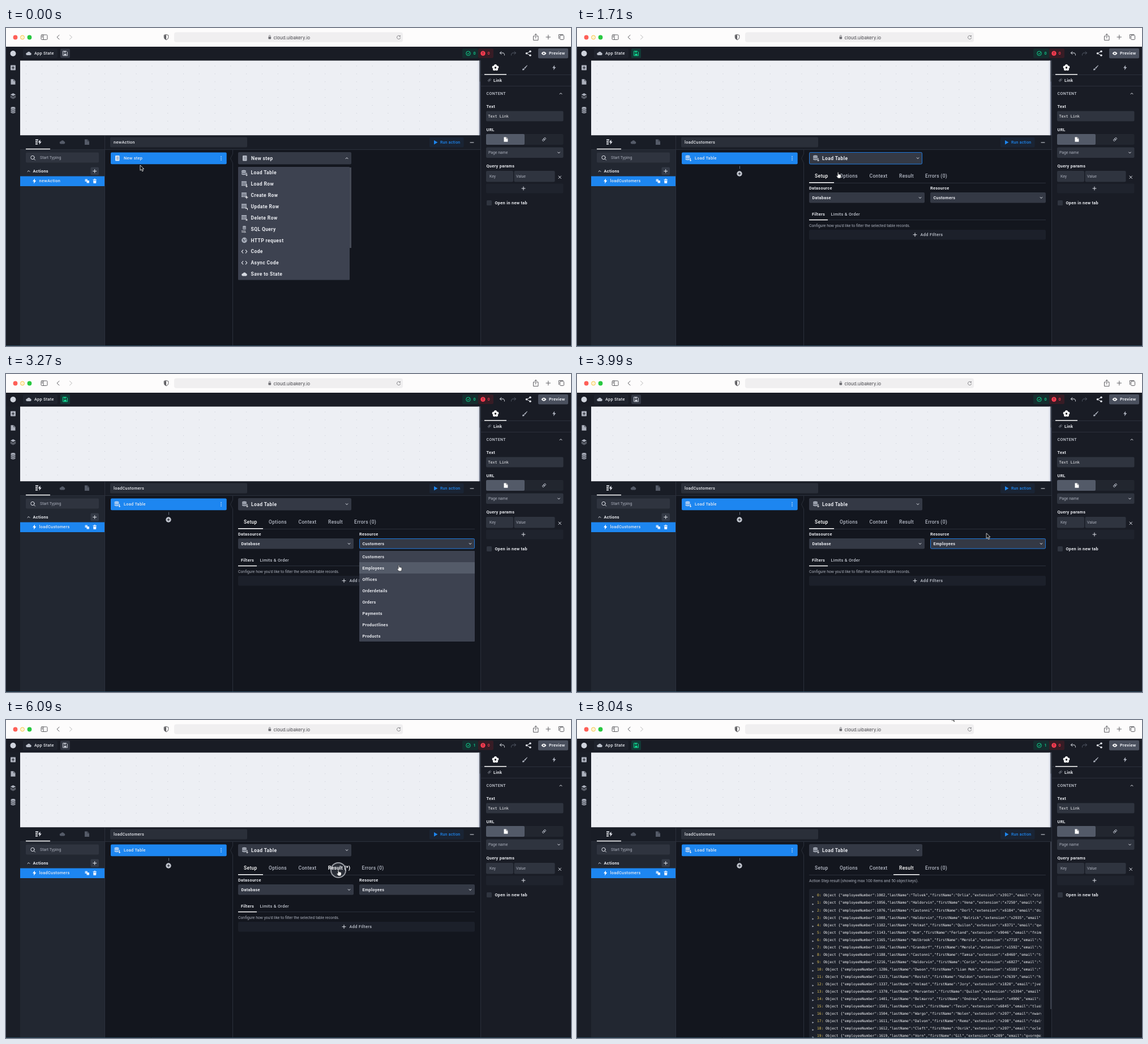
These frames come from a looping animation (998 px wide and 561 px high, 8070 ms). An HTML page:

```html
<!DOCTYPE html>
<html lang="en">
<head>
<meta charset="utf-8">
<title>Load Table action</title>
<style>
html,body{margin:0;width:100%;height:100%;overflow:hidden;background:#13161e}
svg{display:block}
#stage{width:998px;height:561px}
text{font:500 7.3px Roboto,sans-serif;letter-spacing:.33px;fill:#e9ebf0;white-space:pre}
text.b{font-weight:700}
text.h{font-weight:700;font-size:8.5px;letter-spacing:.4px}
text.tab{font-size:8.5px;letter-spacing:.34px;fill:#b4b9c5}
text.r{font-weight:400;font-size:6.85px;letter-spacing:0;fill:#a9aeba}
text.on{fill:#fff}
text.url{font:400 8px Inter,sans-serif;letter-spacing:0;fill:#45454a}
text.code{font:400 6.26px "DejaVu Sans Mono",monospace;letter-spacing:0;fill:#f8f9fb}
.field{fill:#2f343f}
.select{fill:#343945}
.menu{fill:#3d4250}
.blue{fill:#1d86f0}
.line{fill:none;stroke:#dfe2e9;stroke-linecap:round;stroke-linejoin:round}
.thin{stroke:#2b303b;stroke-width:1}
.focus{fill:none;stroke:#1d76d8}

.s{opacity:0;animation:var(--k) 8.07s step-end infinite}
@keyframes fresh{0%{opacity:1}18.96%{opacity:0}}
@keyframes ready{0%{opacity:0}18.96%{opacity:1}}
@keyframes rowHover{0%{opacity:0}12.8%{opacity:1}18.96%{opacity:0}}
@keyframes stepFocus{0%{opacity:0}18.96%{opacity:1}35.32%{opacity:0}}
@keyframes customers{0%{opacity:1}44.11%{opacity:0}}
@keyframes employees{0%{opacity:0}44.11%{opacity:1}}
@keyframes resFocus{0%{opacity:0}35.32%{opacity:1}60.7%{opacity:0}}
@keyframes resMenu{0%{opacity:0}35.32%{opacity:1}44.11%{opacity:0}}
@keyframes runHover{0%{opacity:0}57%{opacity:1}66.2%{opacity:0}}
@keyframes loading{0%{opacity:0}61.34%{opacity:1}67.53%{opacity:0}}
@keyframes idle{0%{opacity:1}61.34%{opacity:0}67.53%{opacity:1}}
@keyframes before{0%{opacity:1}67.53%{opacity:0}}
@keyframes after{0%{opacity:0}67.53%{opacity:1}}
@keyframes star{0%{opacity:0}67.53%{opacity:1}76.21%{opacity:0}}
@keyframes noStar{0%{opacity:1}67.53%{opacity:0}76.21%{opacity:1}}
@keyframes setup{0%{opacity:1}76.21%{opacity:0}}
@keyframes result{0%{opacity:0}76.21%{opacity:1}}
@keyframes resultHover{0%{opacity:0}72.6%{opacity:1}76.21%{opacity:0}}
@keyframes saved{0%{opacity:0}12.4%{opacity:1}23.5%{opacity:0}32.2%{opacity:1}41%{opacity:0}58%{opacity:1}68%{opacity:0}94%{opacity:1}}
@keyframes hand{0%{opacity:0}14%{opacity:1}21.5%{opacity:0}32%{opacity:1}45.5%{opacity:0}57%{opacity:1}66%{opacity:0}72.5%{opacity:1}79.5%{opacity:0}}
@keyframes arrow{0%{opacity:1}14%{opacity:0}21.5%{opacity:1}32%{opacity:0}45.5%{opacity:1}57%{opacity:0}66%{opacity:1}72.5%{opacity:0}79.5%{opacity:1}}

#cursor{animation:move 8.07s ease-in-out infinite}
@keyframes move{
0%,5%{transform:translate(237px,242px)}
16%,21%{transform:translate(461px,254px)}
31.23%{transform:translate(686px,284px)}
33.5%,36%{transform:translate(692px,299px)}
42%{transform:translate(694px,342px)}
45%{transform:translate(694px,342px);animation-timing-function:ease-in}
49.44%{transform:translate(723px,281px);animation-timing-function:ease-out}
57.6%,65.7%{transform:translate(770px,207px)}
73%,80%{transform:translate(587px,264px)}
91%{transform:translate(600px,330px)}
99.63%,100%{transform:translate(662px,-7px)}
}
#ring{opacity:0;animation:click 8.07s linear infinite}
@keyframes click{
0%,16.6%,18.97%,34.2%,36.2%,42.7%,44.7%,59.6%,61.5%,73.6%,76.3%{opacity:0;transform:scale(.85)}
17.2%,34.7%,43.2%,60.1%,74.1%{opacity:1;transform:scale(1.1)}
18.4%,35.7%,44.2%,61%,75.6%{opacity:1;transform:scale(.85)}
100%{opacity:0}
}
.spin{fill:none;stroke:#8b91a0;stroke-width:1.6;stroke-linecap:round;animation:spin .807s linear infinite}
@keyframes spin{to{transform:rotate(360deg)}}
</style>
</head>
<body>
<svg id="stage" viewBox="0 0 998 561">
<defs>
  <pattern id="dots" x="35" y="66.5" width="27.8" height="13.9" patternUnits="userSpaceOnUse"><rect width="1" height="1" fill="#c6cad3"/></pattern>
  <clipPath id="clip"><rect x="410" y="298" width="410" height="262"/></clipPath>
  <g id="page"><path d="M0 0h5l3 3v6.500h-8z"/><path d="M5 0v3h3" fill="none" stroke="#20242e" stroke-width=".7"/></g>
  <g id="stack"><ellipse cx="4" cy="1.600" rx="4" ry="1.600"/><path d="M0 2.600q4 2.400 8 0v2q-4 2.400-8 0zM0 5.600q4 2.400 8 0v2q-4 2.400-8 0z"/></g>
  <g id="load"><use href="#stack"/><path d="M9 5v5M7.500 8.700L9 10.300l1.500-1.600" fill="none" stroke="#f1f3f7"/></g>
  <g id="grid"><path d="M0 0h9v8h-9z"/><path d="M0 2.500h9M0 5h9M3 2.500v5.500M6 2.500v5.500" stroke="#3d4250" stroke-width=".6"/></g>
  <g id="note"><rect width="7.500" height="9.500" rx="1"/><path d="M2 2.500h4M2 4.500h4M2 6.500h4" stroke="#68707f" stroke-width=".7"/></g>
  <path id="cloud" d="M2.500 7a2.300 2.300 0 0 1 0-4.600A3 3 0 0 1 8 2.500a2.300 2.300 0 0 1 0 4.500z"/>
  <path id="down" class="line" d="M-1.800 -1L0 1L1.800 -1"/>
  <path id="up" class="line" d="M-2 1L0 -1L2 1"/>
  <path id="bolt" d="M4 0L0 5h2.500L2 9l4.300-5.400H3.800z"/>
  <path id="plus" class="line" d="M-3 0h6M0 -3v6"/>
  <g id="chain" class="line" style="stroke:#b4b9c5"><rect x="-4" y="-1.700" width="4.800" height="3.400" rx="1.700" transform="rotate(-45)"/><rect x="-.8" y="-1.700" width="4.800" height="3.400" rx="1.700" transform="rotate(-45)"/></g>
  <g id="disk"><path d="M.5 .5h6l2 2v6h-8z" fill="none" stroke="currentColor"/><path d="M2.300 1h3.500v2h-3.500zM2.300 5h4.400v3.300h-4.400z" fill="currentColor"/></g>
</defs>

<!-- browser bar -->
<rect width="998" height="33" fill="#fdfcfc"/>
<circle cx="16.500" cy="16.500" r="3.900" fill="#fe5f57"/><circle cx="29" cy="16.500" r="3.500" fill="#fff3cf" stroke="#f4bf3f" stroke-width=".9"/><circle cx="41.500" cy="16.500" r="3.900" fill="#28c840"/>
<g fill="none" stroke="#606064" stroke-linecap="round" stroke-linejoin="round">
  <rect x="62" y="12" width="11" height="8.500" rx="1.500"/><path d="M66 12v8.500M63.500 14.200h1M63.500 16h1"/>
  <path d="M94 12.500l-4 3.700 4 3.700"/><path d="M112.500 12.500l4 3.700-4 3.700" stroke="#bbb"/>
  <path d="M283 11.500l3.800 1.300v3.700q0 3-3.800 4.500-3.800-1.500-3.800-4.500v-3.700z"/>
  <path d="M283 12v8.500q-3.500-1.500-3.500-4v-3.500z" fill="#606064" stroke="none"/>
  <path d="M934 14.200h-2.500v7.300h8.500v-7.300h-2.500M935.800 18v-7.500M933.800 12.300l2-2 2 2M954 16h7.500M957.800 12.300v7.500"/>
  <rect x="978.500" y="13" width="7" height="7.500" rx="1.200"/><path d="M976.500 18.500v-7h7.500"/>
</g>
<rect x="297" y="7.500" width="404" height="17.500" rx="4" fill="#f0eff0"/>
<rect x="463.500" y="15.500" width="4.600" height="4" rx=".7" fill="#6b6b70"/><path d="M464.500 15.500v-1.300a1.300 1.300 0 0 1 2.600 0v1.300M696 14.500a3.100 3.100 0 1 0 .7 2.400M696.300 13v2h-2" fill="none" stroke="#6b6b70" stroke-width=".8"/>
<text class="url" x="472.500" y="19.700">cloud.uibakery.io</text>

<!-- app frame -->
<rect y="33" width="998" height="25" fill="#191c25"/>
<rect y="57" width="25" height="504" fill="#1a1e27"/>
<rect x="838" y="57" width="160" height="504" fill="#191c25"/>
<circle cx="12.500" cy="45" r="5" fill="#cfd3dc"/>
<rect x="30" y="36.500" width="61" height="16.500" rx="2" fill="#1f232d"/>
<use href="#cloud" x="35" y="41" fill="#b9bec9"/><text x="50" y="47">App State</text>
<rect x="96" y="36.500" width="17" height="16.500" rx="2" fill="#323743"/><use href="#disk" x="100" y="40.300" color="#c6cad4"/>
<g class="s" style="--k:saved"><rect x="96" y="36.500" width="17" height="16.500" rx="2" fill="#123a36"/><use href="#disk" x="100" y="40.300" color="#10d58f"/></g>
<rect x="806" y="36.500" width="28" height="16.500" rx="2" fill="#152d2e"/><rect x="834" y="36.500" width="27" height="16.500" rx="2" fill="#371c25"/>
<circle cx="816.500" cy="44.800" r="3.800" fill="none" stroke="#10d58f"/><path d="M814.700 44.800l1.500 1.500 2.400-3" fill="none" stroke="#10d58f"/>
<circle cx="842.500" cy="44.800" r="4.200" fill="#fa3c50"/><path d="M842.500 42.300v3M842.500 46.500v.8" stroke="#371c25"/>
<g style="--k:before" class="s"><text x="825.500" y="47.400" style="fill:#10d58f">0</text></g>
<g style="--k:after" class="s"><text x="825.500" y="47.400" style="fill:#10d58f">1</text></g>
<text x="850.500" y="47.400" style="fill:#fa3c50">0</text>
<path class="line" d="M875 41.500l-2.500 2.500 2.500 2.500M872.500 44h5.500q2.500 0 2.500 4"/>
<path class="line" style="stroke:#555b68" d="M898 41.500l2.500 2.500-2.500 2.500M900.500 44h-5.500q-2.500 0-2.500 4"/>
<g fill="#dfe2e9"><circle cx="919.500" cy="44.800" r="1.800"/><circle cx="926" cy="41.300" r="1.800"/><circle cx="926" cy="48.300" r="1.800"/><path d="M926 41.300l-6.500 3.500 6.500 3.500" fill="none" stroke="#dfe2e9"/></g>
<rect x="940" y="36" width="53" height="17.500" rx="2" fill="#4a505e"/>
<path d="M945.500 44.800q4.500-6 9 0q-4.500 6-9 0z" fill="#fff"/><circle cx="950" cy="44.800" r="1.300" fill="#4a505e"/>
<text class="b" x="959" y="47.300">Preview</text>
<g fill="#abb0bc">
  <rect x="8" y="65.500" width="9" height="9" rx="1"/><path d="M12.500 67.500v5M10 70h5" stroke="#1a1e27"/>
  <use href="#page" x="8.500" y="90.300"/>
  <path d="M12.500 115l4.700 2.500-4.700 2.500-4.700-2.500zM7.800 119.500l4.700 2.500 4.700-2.500v1l-4.700 2.500-4.700-2.500zM7.800 121.700l4.700 2.500 4.700-2.500v.9l-4.700 2.500-4.700-2.500z"/>
  <use href="#stack" x="8.500" y="139"/><path d="M8.500 147.600q4 2.400 8 0v1.600q-4 2.400-8 0z"/>
</g>
<rect x="25" y="57.500" width="811" height="132" fill="#edeff4"/>
<rect x="25" y="66" width="809" height="122" fill="url(#dots)"/>
<path d="M834.500 57.500v132" stroke="#c9cfdd"/>
<rect x="836" y="57.500" width="2" height="132" fill="#5c6377"/><rect x="836" y="57.500" width="2" height="37" fill="#4a4f5c"/>

<!-- properties -->
<use href="#chain" transform="translate(854 92) scale(.75)" stroke-opacity=".6"/>
<text class="b" x="861" y="94.600">Link</text>
<path class="thin" d="M838.500 57v504M838 82.500h160M838 102.500h160"/>
<path d="M845 82h39" stroke="#fff" stroke-width="1.400"/>
<g fill="#fff"><circle cx="864.500" cy="66.500" r="2.500"/><circle cx="861.200" cy="69" r="2.500"/><circle cx="867.800" cy="69" r="2.500"/><circle cx="862.500" cy="72.700" r="2.500"/><circle cx="866.500" cy="72.700" r="2.500"/><circle cx="864.500" cy="70" r="1.700" fill="#191c25"/></g>
<g fill="#abb0bc"><path d="M920.500 65.500l-5.500 5 1.500 1.500 4.500-5.700zM914.500 71.300q-2.500 0-2.500 3 4 .5 3.800-1.800z"/><use href="#bolt" x="965" y="65.500"/></g>
<text x="848.500" y="118" style="font-size:7px;letter-spacing:.4px;fill:#c9cdd6">CONTENT</text><use href="#up" x="980" y="115.700"/>
<text class="b" x="848.500" y="140.700">Text</text>
<rect class="field" x="848" y="146.500" width="136.500" height="18" rx="2"/><text class="code" style="font-size:6.700px" x="851.500" y="157.800">Text Link</text>
<text class="b" x="848.500" y="181.700">URL</text>
<rect x="848" y="187" width="136.500" height="19" rx="2" fill="#22262f"/><rect x="848" y="187" width="68" height="19" rx="2" fill="#535a68"/>
<use href="#page" transform="translate(879.500 192.500) scale(.86)" fill="#fff"/><use href="#chain" transform="translate(950.500 196.500) scale(.9)"/>
<rect class="field" x="848" y="210.500" width="136.500" height="18.500" rx="2"/><text class="r" x="852" y="222">Page name</text><use href="#down" x="976.500" y="220"/>
<text class="b" x="848.500" y="246.300">Query params</text>
<rect class="field" x="848" y="252" width="48" height="19.500" rx="2"/><rect class="field" x="897.500" y="252" width="72" height="19.500" rx="2"/>
<text class="r" x="854" y="263.800">Key</text><text class="r" x="901" y="263.800">Value</text>
<path class="line" d="M976 261l4.500 4.500M980.500 261l-4.500 4.500"/>
<rect x="848" y="274.500" width="136.500" height="17" rx="2" fill="#1f232d"/><use href="#plus" x="914" y="283"/>
<rect class="field" x="849" y="304" width="9" height="9" rx="1.500"/><text class="b" x="863.500" y="310.600">Open in new tab</text>

<!-- actions list -->
<rect x="25" y="189.500" width="813" height="25" fill="#191d26"/>
<rect x="25" y="214" width="149.500" height="347" fill="#222731"/>
<path class="thin" d="M25 214.500h813M174.500 190v371"/>
<path d="M35 213.500h43" stroke="#fff" stroke-width="1.500"/>
<g fill="#e4e7ee"><path d="M52 196.500h5v2h-5zM52 200h4v2h-4zM52 203.500h4v2h-4z"/><use href="#bolt" x="56.500" y="196.800"/></g>
<use href="#cloud" x="94.500" y="197.500" fill="#555b68"/><use href="#page" x="139" y="196.500" fill="#555b68"/>
<rect x="35" y="219.500" width="129" height="18" rx="2" fill="#2f343f"/>
<circle class="line" cx="47" cy="228.500" r="3.200"/><path class="line" d="M49.500 231l2 2"/><text class="r" style="font-size:7px" x="60" y="230.500">Start Typing</text>
<use href="#up" x="40" y="252.500"/><text class="b" x="47.500" y="254.800">Actions</text>
<rect x="149.500" y="245.500" width="14.500" height="14" rx="2" fill="#343a46"/><use href="#plus" x="156.700" y="252.500"/>
<rect class="blue" x="25" y="261.500" width="149" height="17.500"/>
<use href="#bolt" x="47" y="265.500" fill="#fff"/>
<g fill="#e8f2ff"><rect x="139.500" y="266.500" width="4.500" height="4.500" rx=".6" opacity=".8"/><rect x="142.500" y="269" width="4.500" height="4.500" rx=".6"/><path d="M153.500 267h6.500v1h-6.500zM155.500 266h2.500v1h-2.500zM154 268.700h5.500l-.4 5.300h-4.700z"/></g>

<!-- step bar -->
<rect x="184" y="192.500" width="242" height="18" rx="2" fill="#2a2f39"/>
<g class="s" style="--k:fresh"><text x="190" y="203.800">newAction</text><text x="58.500" y="272.300">newAction</text></g>
<g class="s" style="--k:ready"><text x="190" y="203.800">loadCustomers</text><text x="58.500" y="272.300">loadCustomers</text></g>
<rect x="748" y="193" width="60.500" height="17.500" rx="2" fill="#1a2434"/>
<rect class="s" style="--k:runHover" x="748" y="193" width="60.500" height="17.500" rx="2" fill="#244468"/>
<path class="blue" d="M756 198l6.500 3.700-6.500 3.700z"/><text x="767" y="204.200" style="font-size:6.800px;letter-spacing:.3px;fill:#1d86f0">Run action</text>
<g class="s" style="--k:loading"><rect x="748" y="193" width="60.500" height="17.500" rx="2" fill="#244468" opacity=".4"/><g transform="translate(778 202)"><path class="spin" style="stroke-width:1.200" d="M0 -4.500A4.500 4.500 0 1 1 -4.500 0"/></g></g>
<path class="line" d="M820 202h6"/>
<path class="thin" d="M400.500 214v8l-4 8 4 8v323" fill="#13161e"/>

<!-- step card -->
<g class="s" style="--k:idle">
  <rect class="blue" x="185" y="219.500" width="204.700" height="20.700" rx="2"/>
  <g class="s" style="--k:fresh" fill="#d6e7fb"><use href="#note" x="193" y="225"/><text x="208" y="232.300">New step</text></g>
  <g class="s" style="--k:ready" fill="#b7d2f2"><use href="#load" x="191.500" y="224.500"/><text x="208" y="232.300">Load Table</text></g>
</g>
<g class="s" style="--k:loading">
  <rect x="185" y="219.500" width="204.500" height="20.500" rx="2" fill="#13161e" stroke="#1d86f0"/><rect class="blue" x="371" y="219.500" width="18.700" height="20.700"/>
  <g transform="translate(278 230)"><path class="spin" d="M0 -6.500A6.500 6.500 0 1 1 -6.500 0"/></g>
</g>
<path d="M380 226.800v.01M380 229.800v.01M380 232.800v.01" stroke="#fff" stroke-width="1.500" stroke-linecap="round"/>
<g class="s" style="--k:ready"><path d="M287.500 243.500v5" stroke="#69707e"/><circle cx="287" cy="257" r="4.700" fill="#c3c7d0"/><path d="M284.700 257h4.600M287 254.700v4.600" stroke="#13161e"/></g>

<rect class="select" x="410" y="219" width="200" height="21.500" rx="2"/>
<g class="s" style="--k:fresh">
  <use href="#note" x="418" y="225" fill="#b9bec9"/><text class="h" x="433" y="232.800">New step</text><use href="#up" x="602" y="229.700"/>
  <rect class="menu" x="410" y="245" width="197" height="199.500" rx="1"/><rect x="607" y="246" width="3" height="142" fill="#454a56"/>
  <rect class="s" style="--k:rowHover" x="410" y="245.500" width="197" height="20" fill="#545b69"/>
  <g id="steps" fill="#aab0bc"></g>
</g>

<!-- step settings -->
<g class="s" style="--k:ready">
  <use href="#load" x="417" y="224.500" fill="#aab0bc"/><text class="h" x="433" y="232.800">Load Table</text><use href="#down" x="602" y="229.700"/>
  <rect class="focus s" style="--k:stepFocus" x="410.500" y="219.500" width="199" height="20.500" rx="2"/>
  <path class="thin" d="M410 273.500h418"/>
  <text class="tab" x="464" y="264.200">Options</text><text class="tab" x="516.500" y="264.200">Context</text>
  <g class="s" style="--k:noStar"><text class="tab" x="615" y="264.200">Errors (0)</text></g>
  <g class="s" style="--k:star"><text class="tab" x="569" y="264.200">Result (*)</text><text class="tab" x="628.500" y="264.200">Errors (0)</text></g>
  <g class="s" style="--k:resultHover"><text class="tab on" x="569" y="264.200">Result (*)</text></g>
  <g class="s" style="--k:setup">
    <g class="s" style="--k:before"><text class="tab" x="569" y="264.200">Result</text></g>
    <text class="tab on" x="420" y="264.200">Setup</text><path d="M410 272.700h44" stroke="#fff" stroke-width="1.500"/>
    <text class="b" x="410" y="284.700">Datasource</text><text class="b" x="624" y="284.700">Resource</text>
    <rect class="select" x="410" y="290" width="204" height="18.500" rx="2"/><rect class="select" x="624" y="290" width="204" height="18.500" rx="2"/>
    <text class="b" x="415.500" y="301.600">Database</text><use href="#down" x="606" y="299.500"/><use href="#down" x="820" y="299.500"/>
    <g class="s" style="--k:customers"><text class="b" x="629.500" y="301.600">Customers</text></g>
    <g class="s" style="--k:employees"><text class="b" x="629.500" y="301.600">Employees</text></g>
    <rect class="focus s" style="--k:resFocus" x="624.500" y="290.500" width="203" height="17.500" rx="2"/>
    <text class="b" x="415" y="330.800">Filters</text><text x="448.500" y="330.800" style="fill:#c4c8d2">Limits &amp; Order</text>
    <path class="thin" d="M410 338.500h418"/><path d="M410 338.500h33" stroke="#fff" stroke-width="1.400"/>
    <text class="r" x="410" y="350.500">Configure how you'd like to filter the selected table records.</text>
    <rect x="410" y="356" width="418" height="17.500" rx="2" fill="#1c202a"/><use href="#plus" x="597" y="364.700"/><text x="606.500" y="367" style="letter-spacing:.42px;fill:#c4c8d2">Add Filters</text>
    <g class="s" style="--k:resMenu"><rect class="menu" x="624" y="312" width="204" height="160" rx="1"/><rect x="624" y="332" width="204" height="20" fill="#545b69"/><g id="tables"></g></g>
  </g>
  <g class="s" style="--k:result">
    <text class="tab" x="420" y="264.200">Setup</text><text class="tab on" x="569" y="264.200">Result</text><path d="M559 272.700h46" stroke="#fff" stroke-width="1.500"/>
    <text class="r" x="410" y="285.800">Action Step result (showing max 100 items and 50 object keys).</text>
    <rect x="410" y="298" width="415" height="263" rx="2" fill="#1d212b"/><rect x="836" y="215" width="2" height="295" fill="#3d424e"/>
    <g id="rows" clip-path="url(#clip)"></g>
  </g>
</g>
<path d="M0 560.500h998" stroke="#29485c"/>

<g id="cursor">
  <g id="ring"><circle cy="1" r="15" fill="#a4a9b5" fill-opacity=".16" stroke="#d5d8df" stroke-opacity=".75" stroke-width="2"/></g>
  <path class="s" style="--k:arrow" d="M0 0v9.300l2.200-2 1.500 3.500 1.700-.8-1.500-3.400h2.800z" fill="#080808" stroke="#fff" stroke-width=".8"/>
  <path class="s" style="--k:hand" d="M-.9 .8q.9-1.500 1.800 0v3.300q1-.8 1.600.2 1-.5 1.500.4 1-.3 1.300.7v2.200q0 1.800-1 3.400h-4.600q-.8-1.700-2.800-4 .4-1.600 2.200 0z" fill="#fff" stroke="#15171c" stroke-width=".7"/>
</g>
</svg>
<script>
const fill = (id, items, draw) =>
  document.getElementById(id).innerHTML = items.map(draw).join('');

// Small marks drawn over a table icon, by row.
const marks = [, 'M9 5v5M7.500 8.700L9 10.300l1.500-1.600', 'M9 6v5M6.500 8.500h5', 'M7 8h3.500v3', 'M7.500 7l3 3M10.500 7l-3 3'];
const table = i => `<use href="#grid"/><path d="${marks[i]}" fill="none" stroke="#fff"/>`;
const code = '<path d="M3 1.500L.3 4.500L3 7.500M7 1.500L9.700 4.500L7 7.500" fill="none" stroke="#e4e7ee" stroke-width="1.100"/>';
const icons = i => [
  '<use href="#load"/>', table(i), table(i), table(i), table(i),
  '<use href="#stack" transform="translate(2 -1) scale(.75)"/><text x="0" y="11" style="font-size:4.500px;letter-spacing:0">SQL</text>',
  '<circle cx="5" cy="4.500" r="4.800"/><path d="M2 2l3 1 1 3-2 1zM7 1l2 3-2 1z" fill="#565d6b"/>',
  code, code, '<use href="#cloud" y="1" fill="#d5d9e1"/>'
][i];
const steps = ['Load Table', 'Load Row', 'Create Row', 'Update Row', 'Delete Row',
  'SQL Query', 'HTTP request', 'Code', 'Async Code', 'Save to State'];
fill('steps', steps, (s, i) => {
  const y = 255.2 + i * 19.9;
  return `<g transform="translate(416 ${y - 4.7})">${icons(i)}</g><text class="h" x="432.500" y="${y + 2.9}">${s}</text>`;
});

fill('tables', ['Customers', 'Employees', 'Offices', 'Orderdetails', 'Orders', 'Payments', 'Productlines', 'Products'],
  (s, i) => `<text class="b" x="629.500" y="${324.6 + i * 20}">${s}</text>`);

const staff = `1002,Tolvek,Orlia,x3917
1056,Haldorvin,Vena,x7250
1076,Castonni,Dorl,x6184
1088,Haldorvin,Belrick,x2935
1102,Velmat,Quilon,x8371
1143,Nim,Ferland,x9046
1165,Wolbrook,Merola,x7718
1166,Grandorf,Merola,x1592
1188,Castonni,Tamsa,x8460
1216,Haldorvin,Corin,x6027
1286,Dwoon,Lian Mok,x5183
1323,Rostel,Haldon,x7639
1337,Velmat,Jory,x1820
1370,Morvantes,Quilon,x5394
1401,Belmarro,Ondrea,x4906
1501,Lusk,Tevin,x6845
1504,Wargo,Nolen,x207
1611,Dalvon,Remo,x208
1612,Cleft,Osrik,x207
1619,Vorn,Gil,x209`.split('\n');
fill('rows', staff, (line, i) => {
  const [employeeNumber, lastName, firstName, extension] = line.split(',');
  const email = (firstName[0] + lastName).toLowerCase() + '@example.com';
  const json = JSON.stringify({employeeNumber: +employeeNumber, lastName, firstName, extension, email});
  const y = 311.4 + i * 13.05;
  return `<path d="M415.500 ${y - 1}l3 1.500-3 1.500z" fill="#aab0bc"/>` +
    `<text class="code" x="424" y="${y}"><tspan fill="#e5c558">${i}:</tspan> Object ${json}</text>`;
});
</script>
</body>
</html>
```
